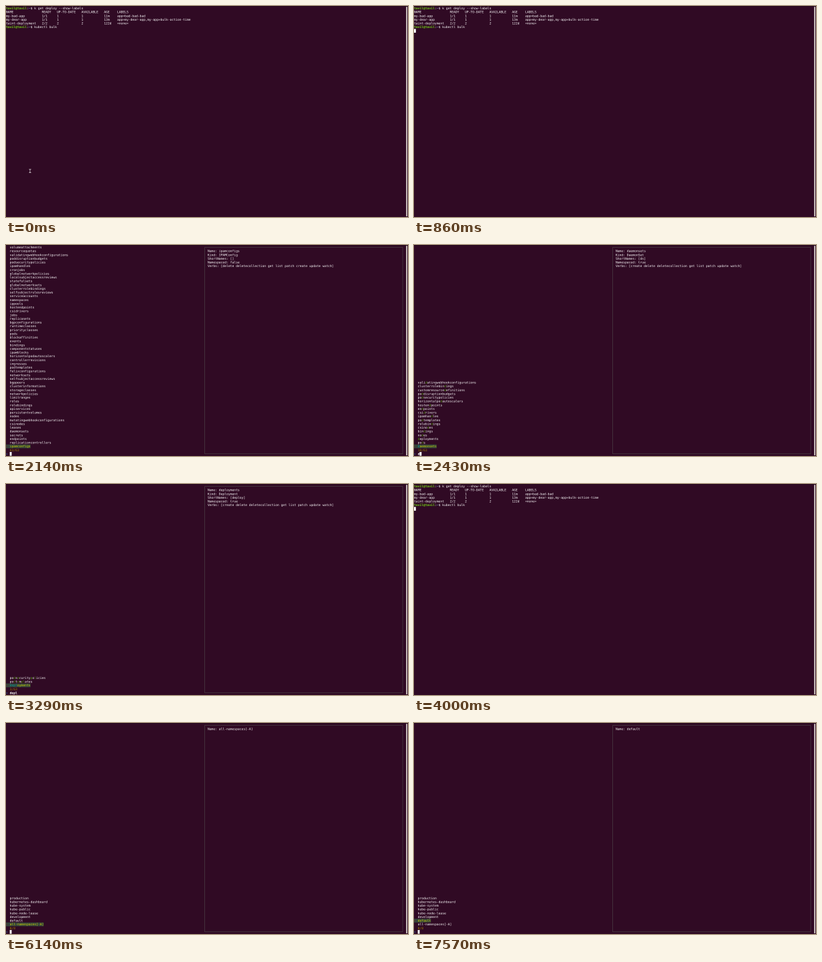
Write an HTML page with a canvas that moves like this. It is 600x316 px and loops after 8000 ms.

```html
<!DOCTYPE html>
<html>
<head>
<meta charset="utf-8">
<style>
html, body { margin: 0; width: 100%; height: 100%; overflow: hidden; background: #300a24; }
canvas { display: block; width: 600px; height: 316px; }
</style>
</head>
<body>
<canvas id="c" width="1200" height="632"></canvas>
<script>
const ctx = document.getElementById('c').getContext('2d');
const W = 9, H = 18, TOP = 2;          // terminal cell in screen units, 1920 wide
const INFO = 54, INPUT = 55;           // rows
const WHITE = '#fff', GREEN = '#4e9a06', BLUE = '#3465a4';

const resources = `volumeattachments resourcequotas validatingwebhookconfigurations
poddisruptionbudgets podsecuritypolicies ipamhandles cronjobs globalnetworkpolicies
localsubjectaccessreviews statefulsets globalnetworksets clusterrolebindings
selfsubjectrulesreviews serviceaccounts namespaces ippools hostendpoints csidrivers jobs
replicasets bgpconfigurations runtimeclasses priorityclasses pods blockaffinities events
bindings componentstatuses ipamblocks horizontalpodautoscalers controllerrevisions ingresses
podtemplates felixconfigurations networksets selfsubjectaccessreviews bgppeers
clusterinformations storageclasses networkpolicies limitranges roles rolebindings apiservices
persistentvolumes nodes mutatingwebhookconfigurations csinodes leases daemonsets secrets
endpoints replicationcontrollers ipamconfigs`.split(/\s+/);

const withD = `validatingwebhookconfigurations clusterrolebindings customresourcedefinitions
poddisruptionbudgets podsecuritypolicies horizontalpodautoscalers hostendpoints endpoints
csidrivers ipamhandles podtemplates rolebindings csinodes bindings nodes deployments pods
daemonsets`.split(/\s+/);

const withDe = `validatingwebhookconfigurations customresourcedefinitions poddisruptionbudgets
podsecuritypolicies horizontalpodautoscalers csidrivers ipamhandles podtemplates csinodes
daemonsets deployments nodes`.split(/\s+/);

const withDepl = ['podsecuritypolicies', 'podtemplates', 'deployments'];

const spaces = `production kubernetes-dashboard kube-system kube-public kube-node-lease
development default all-namespaces[-A]`.split(/\s+/);

const info = (name, kind, short, namespaced,
  verbs = 'create delete deletecollection get list patch update watch') => [
  'Name: ' + name, 'Kind: ' + kind, `ShortNames: [${short}]`,
  'Namespaced: ' + namespaced, `Verbs: [${verbs}]`];

const pickers = [
  { at: 1000, list: resources, total: 63, count: 63, query: '',
    preview: info('ipamconfigs', 'IPAMConfig', '', false,
      'delete deletecollection get list patch create update watch') },
  { at: 2430, list: withD, total: 63, query: 'd', preview: info('daemonsets', 'DaemonSet', 'ds', true) },
  { at: 2570, list: withDe, total: 63, query: 'de', preview: info('nodes', 'Node', 'no', false) },
  { at: 2710, list: withDepl, total: 63, query: 'depl', preview: info('deployments', 'Deployment', 'deploy', true) },
  { at: 5000, list: spaces, total: 8, query: '', preview: ['Name: all-namespaces[-A]'] },
  { at: 7570, list: spaces, total: 8, query: '', up: 1, preview: ['Name: default'] }
];

const cursorOff = [[0, 140], [1570, 2140], [3290, 4000], [4570, 5000], [5570, 6140], [6860, 7430]];

function text(s, col, row, color = WHITE, bold = false) {
  ctx.font = (bold ? 'bold ' : '') + '14.95px "DejaVu Sans Mono", monospace';
  ctx.fillStyle = color;
  ctx.fillText(s, col * W, TOP + row * H + 14);
}

function fill(col, row, n, color) {
  ctx.fillStyle = color;
  ctx.fillRect(col * W, TOP + row * H, n * W, H);
}

function rect(x, y, w, h, color) {
  ctx.fillStyle = color;
  ctx.fillRect(x, y, w, h);
}

function prompt(row, command) {
  text('tavil@tavil', 0, row, '#73d216', true);
  text(':', 11, row);
  text('~', 12, row, '#729fcf', true);
  text('$ ' + command, 13, row);
}

function shell(t, blink) {
  prompt(0, 'k get deploy --show-labels');
  const cols = [0, 19, 27, 40, 52, 59];
  [['NAME', 'READY', 'UP-TO-DATE', 'AVAILABLE', 'AGE', 'LABELS'],
   ['my-bad-app', '1/1', '1', '1', '11m', 'app=bad-bad-bad'],
   ['my-dear-app', '1/1', '1', '1', '13m', 'app=my-dear-app,my-app=bulk-action-time'],
   ['taint-deployment', '2/2', '2', '2', '122d', '<none>']
  ].forEach((line, r) => line.forEach((s, i) => text(s, cols[i], r + 1)));
  prompt(5, 'kubectl bulk');
  if (blink) t < 860 ? fill(27, 5, 1, WHITE) : fill(0, 6, 1, WHITE);
  if (t < 710) {
    rect(114, 783, 2, 16, WHITE);
    rect(110, 782, 10, 2, WHITE);
    rect(110, 798, 10, 2, WHITE);
  }
}

// Draws an entry with the letters of the query picked out in order.
function entry(name, row, query, current) {
  if (current) {
    fill(0, row, name.length + 2, '#35443a');
    text('>', 0, row, '#6b2a2a');
  }
  let k = 0;
  [...name].forEach((ch, i) => {
    const hit = ch === query[k];
    if (hit) k++;
    const color = current ? (hit ? '#06989a' : '#d4d400') : (hit ? GREEN : WHITE);
    text(ch, i + 2, row, color);
  });
}

function picker({ list, total, count = list.length, query, up = 0, preview }, blink) {
  const first = INFO - list.length;
  list.forEach((name, i) => entry(name, first + i, query, i === list.length - 1 - up));
  text(`${count}/${total}`, 2, INFO, '#a08000');
  text('>', 0, INPUT, BLUE);
  text(query, 2, INPUT, WHITE, true);
  if (blink) fill(2 + query.length, INPUT, 1, WHITE);

  ctx.strokeStyle = '#555753';
  ctx.lineWidth = 1.6;
  ctx.strokeRect(105.5 * W, TOP + H / 2, 105 * W, INPUT * H);
  preview.forEach((s, i) => text(s, 107, i + 1));
}

function draw() {
  const t = performance.now() % 8000;
  const blink = !cursorOff.some(([a, b]) => t >= a && t < b);
  ctx.setTransform(0.625, 0, 0, 0.625, 0, 0);
  ctx.textRendering = 'geometricPrecision';
  rect(0, 0, 1920, 1012, '#300a24');
  rect(0, 0, 1920, 2, '#200818');
  rect(1911, 4, 6, 1004, '#d3cbc6');
  if (t < 1000 || (t >= 4000 && t < 5000)) shell(t, blink);
  else picker(pickers.findLast(p => t >= p.at), blink);
  requestAnimationFrame(draw);
}
draw();
</script>
</body>
</html>
```
